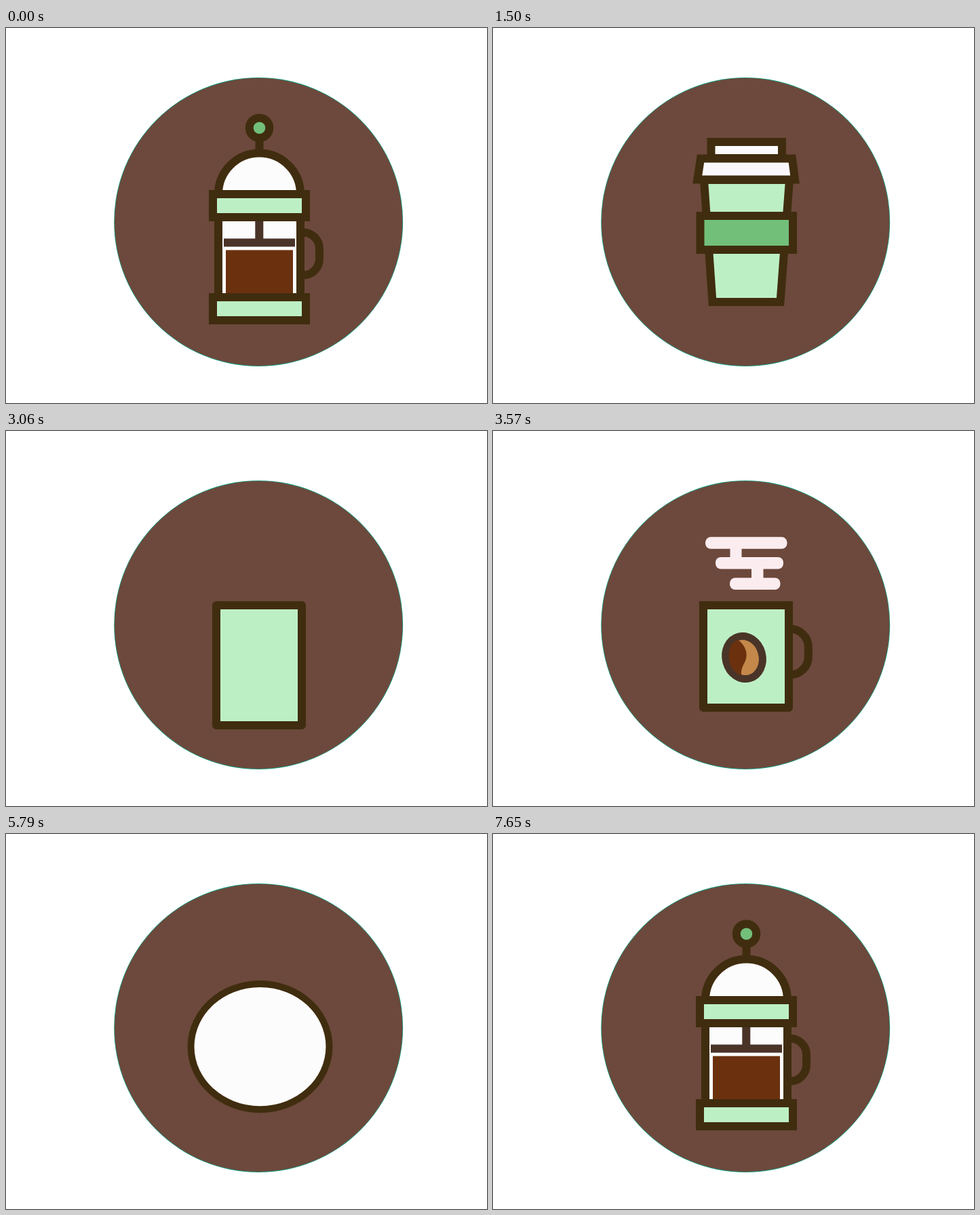
Animation, 709 px wide and 553 px high, one loop 7680 ms. Source, as an HTML page:

```html
<!DOCTYPE html>
<html lang="en">
<head>
<meta charset="utf-8">
<title>Coffee icons</title>
<style>
  html, body { margin: 0; width: 100%; height: 100%; overflow: hidden; background: #fff; }
  svg { display: block; width: 709px; height: 553px; }
  .icon, #body { stroke: #402d0f; stroke-width: 12; fill: none; }
  .icon > * { transform-box: fill-box; transform-origin: center; }
  .icon > .left { transform-origin: left center; }
  .icon > .low { transform-origin: center bottom; }
  .icon .plain { stroke: none; }
  .mint { fill: #bdefc5; }
  .green { fill: #72bf7a; }
  .white { fill: #fcfcfc; }
  .coffee { fill: #6b310e; }
  .steam { fill: #fbecf0; }
  .dark { fill: #402d0f; }
  .bar { fill: #4a3428; }
</style>
</head>
<body>
<svg viewBox="0 0 709 553">
  <circle cx="372.2" cy="286" r="213" fill="#16a085"/>
  <circle cx="372.2" cy="286" r="212.2" fill="#6c493c"/>
  <path id="body"/>

  <g class="icon" data-in="6870" data-hold="1230">
    <path class="left" d="M438 301.5A24 24 0 0 1 462 325.5V340.5A24 24 0 0 1 438 364.5"/>
    <g class="low"><path d="M373.5 163V184"/><circle class="green" cx="373.5" cy="147.3" r="14.8"/></g>
    <path class="plain bar" d="M367.3 280H379.3V310.5H426V322.5H321V310.5H367.3Z"/>
    <rect class="plain coffee low" data-grow=".02" data-settle="810" x="324" y="327.5" width="99" height="64"/>
    <rect class="mint" x="305" y="245" width="137" height="34"/>
    <rect class="mint" x="305" y="397" width="137" height="34"/>
  </g>

  <g class="icon" data-in="420" data-hold="1080">
    <rect class="white low" x="321.5" y="168" width="104.5" height="24"/>
    <path fill="#fbf8fb" d="M306 192.5H441L445 223.5H301.3Z"/>
    <rect class="green" x="305.5" y="277" width="136.5" height="50"/>
  </g>

  <g class="icon" data-in="1500" data-hold="1350">
    <path class="plain green" d="M321 168.5H347V247.5H321ZM321 376H347.5V397.5H321Z"/>
    <path class="plain green" d="M364 178H380.5V237.5H364ZM390.5 179H407V238.5H390.5ZM417.5 178.5H434V238H417.5Z"/>
    <path class="left" d="M420 272H529.5" stroke-width="13" stroke-linecap="round"/>
    <path class="green" stroke-linejoin="round" d="M363 253L369.5 270L362 287.5H423L413.5 270L420 253Z"/>
    <path class="left" d="M419 321H422A12 12 0 0 1 434 333V336A12 12 0 0 1 422 348H419"/>
    <rect class="white low" x="369" y="308" width="49" height="58"/>
  </g>

  <g class="icon" data-in="2850" data-hold="1290">
    <path d="M304 257H442"/>
    <path class="left" d="M438 292A26.5 26.5 0 0 1 464.8 318.5V333A26.5 26.5 0 0 1 438 359.5"/>
    <g>
      <ellipse cx="370" cy="334" rx="27" ry="31.8" transform="rotate(-15 370 334)" fill="#c4884a" stroke="#4a3428" stroke-width="11"/>
      <path class="plain coffee" d="M361 308C374 317 377 332 370 343Q365 352 366 360C353 357 346 340 348 326Q350 312 361 308Z"/>
    </g>
    <g class="plain steam low">
      <rect x="349" y="216.5" width="74.5" height="17.5" rx="8"/>
      <rect x="381" y="200" width="17.5" height="20"/>
      <rect x="328" y="186" width="100" height="17.5" rx="8"/>
      <rect x="349.5" y="170" width="17" height="20"/>
      <rect x="313" y="156.3" width="120.5" height="17.5" rx="8"/>
    </g>
  </g>

  <g class="icon" data-in="4140" data-hold="1410">
    <rect class="plain dark left" x="425" y="270" width="42" height="32" rx="13"/>
    <circle class="white" cx="372" cy="286.3" r="61"/>
    <rect class="plain white left" x="420" y="282" width="35" height="8.5" rx="3"/>
    <g class="plain" data-turn="4" data-grow=".012" data-settle="630">
      <circle class="coffee" cx="372" cy="286.3" r="48.3"/>
      <path fill="#b25e22" d="M384 239.5Q381.500 245 384 254Q387 275 383 289C380 302 342 297 340 322A48.3 48.3 0 0 1 384 239.5Z"/>
    </g>
  </g>

  <g class="icon" data-in="5550" data-hold="1320">
    <path class="left" d="M420 200H481A24 24 0 0 1 505 224V300"/>
    <circle class="green low" cx="375" cy="156" r="8"/>
    <rect class="mint" x="331" y="176" width="88" height="28"/>
    <path class="plain coffee low" data-delay="750" d="M292 309H458C458 360 424 389 375 389S292 360 292 309Z"/>
  </g>
</svg>
<script>
const LOOP = 7680, STEP = 30, SAMPLES = 240;
const MINT = [189, 239, 197], WHITE = [252, 252, 252];

const mug = bottom => `M310 ${bottom}V257H436V${bottom}Z`;
// Closed ellipse that starts at its lower left and runs clockwise.
function oval(cx, cy, rx, ry) {
  const x = rx * Math.SQRT1_2, y = ry * Math.SQRT1_2, arc = `A${rx} ${ry} 0 0 1 `;
  return `M${cx - x} ${cy + y}${arc}${cx + x} ${cy - y}${arc}${cx - x} ${cy + y}Z`;
}

const shape = (d, fill, width = 12, join = 'miter') => ({ d, fill, width, join });
const shapes = {
  press: shape('M313 397V245A60.5 60.5 0 0 1 434 245V397Z', WHITE),
  cup: shape('M323.5 404L311 224H437L423.500 404Z', MINT),
  machine: shape('M259.5 402.5L258.5 162.5L458.500 163L459.5 252.5L327 253V370.5L457.500 372.5V403.500Z', MINT),
  mugTall: shape(mug(434), MINT, 12, 'round'),
  mug: shape(mug(408), MINT, 12, 'round'),
  plateBig: shape(oval(372, 287, 123, 123), MINT),
  plate: shape(oval(372.2, 287, 112.8, 112.2), MINT),
  drop: shape(oval(374.5, 313.6, 102, 92.6), WHITE, 10),
  carafe: shape('M309 372A94 94 0 0 1 340 219V196H410V219A94 94 0 0 1 441 372A94 94 0 0 1 309 372Z', WHITE)
};
const bodyKeys = [
  [0, 'press'], [420, 'press'], [690, 'cup'], [1500, 'cup'], [1770, 'machine'],
  [2850, 'machine'], [3060, 'mugTall'], [3210, 'mug'], [4140, 'mug'],
  [4350, 'plateBig'], [4530, 'plate'], [5550, 'plate'], [5790, 'drop'],
  [5970, 'carafe'], [6870, 'carafe'], [7140, 'press'], [LOOP, 'press']
];

const body = document.getElementById('body');
const clamp = p => Math.max(0, Math.min(1, p));
const easeOut = p => 1 - (1 - clamp(p)) ** 3;
const easeIn = p => clamp(p) ** 2;
const smooth = p => p * p * (3 - 2 * p);
const mix = (a, b, p) => a + (b - a) * p;

for (const s of Object.values(shapes)) {
  body.setAttribute('d', s.d);
  const length = body.getTotalLength();
  s.points = Array.from({ length: SAMPLES }, (_, i) => body.getPointAtLength(length * i / SAMPLES));
}

function morph(a, b, p) {
  return 'M' + a.points.map((from, i) => {
    const to = b.points[i];
    return mix(from.x, to.x, p).toFixed(2) + ' ' + mix(from.y, to.y, p).toFixed(2);
  }).join('L') + 'Z';
}

function drawBody(t) {
  const next = bodyKeys.findIndex(key => key[0] > t);
  const [t0, name0] = bodyKeys[next - 1], [t1, name1] = bodyKeys[next];
  const a = shapes[name0], b = shapes[name1], p = smooth((t - t0) / (t1 - t0));
  const still = a === b || p === 0;
  body.setAttribute('d', still ? a.d : morph(a, b, p));
  body.style.fill = `rgb(${a.fill.map((c, i) => Math.round(mix(c, b.fill[i], p)))})`;
  body.style.strokeWidth = mix(a.width, b.width, p);
  body.style.strokeLinejoin = still ? a.join : 'round';
}

const parts = [...document.querySelectorAll('.icon')].flatMap(icon =>
  [...icon.children].map((el, i) => ({
    el,
    start: +icon.dataset.in,
    hold: +icon.dataset.hold,
    delay: +(el.dataset.delay || 270 + 40 * i),
    settle: +(el.dataset.settle || 0),
    turn: +(el.dataset.turn || 0),
    grow: +(el.dataset.grow || 0)
  })));

function drawPart(part, t) {
  const u = (t - part.start + LOOP) % LOOP;
  const settled = easeOut((u - part.settle) / 240);
  const scale = easeOut((u - part.delay) / 240) * (1 - easeIn((u - part.hold) / 180));
  part.el.style.visibility = scale > 0.001 ? 'visible' : 'hidden';
  part.el.style.transform = `rotate(${part.turn * settled}deg) scale(${scale * (1 + part.grow * settled)})`;
}

const begin = performance.now();
function frame() {
  const t = Math.floor(((performance.now() - begin) % LOOP) / STEP) * STEP;
  drawBody(t);
  parts.forEach(part => drawPart(part, t));
  requestAnimationFrame(frame);
}
frame();
</script>
</body>
</html>
```
